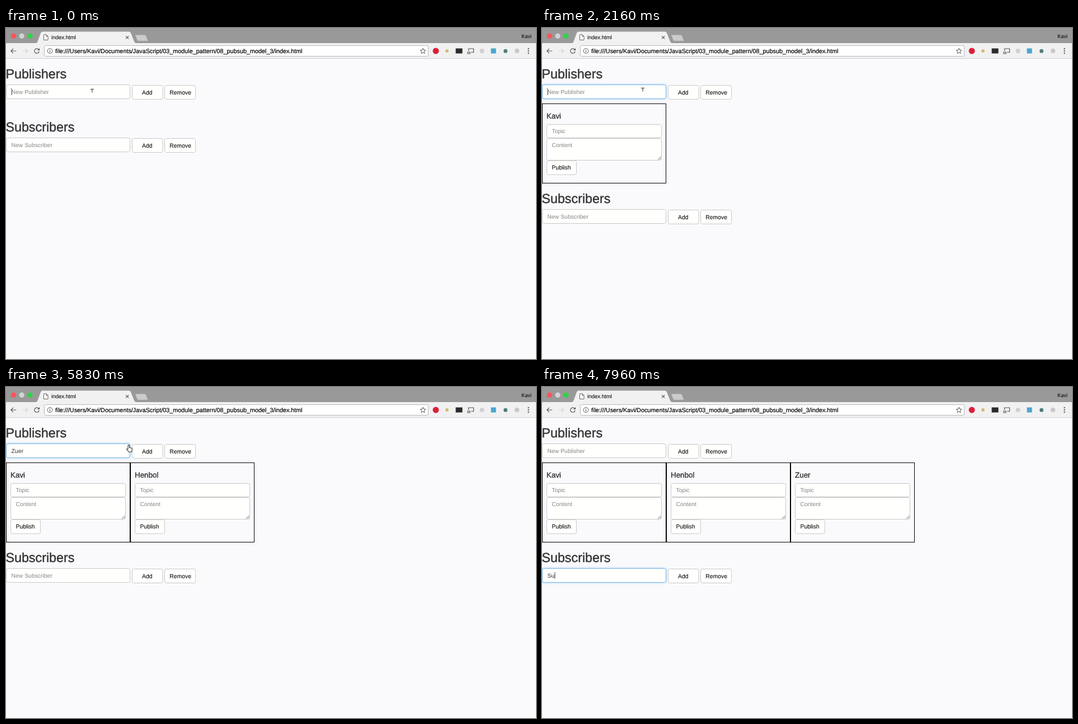
These frames come from a looping animation (947 by 592 pixels, 8000 ms). An HTML page:

```html
<!DOCTYPE html>
<html lang="en">
<head>
<meta charset="utf-8">
<title>index.html</title>
<style>
  html, body { margin: 0; width: 100%; height: 100%; overflow: hidden; background: #fafafd; }
  svg { display: block; width: 947px; height: 592px; }
  text { font: 10.4px "Liberation Sans", Arial, sans-serif; fill: #333; white-space: pre; text-rendering: geometricPrecision; }
  .head { font-size: 23.3px; stroke: #333; stroke-width: .4px; }
  .name { font-size: 13.4px; stroke: #333; stroke-width: .35px; }
  .hint { fill: #858587; }
  .dark { fill: #161616; stroke: #161616; stroke-width: .12px; }
  .box { fill: #fffffd; stroke: #c8c8c8; }
  .line { fill: none; stroke: #555; stroke-width: 1.2; }
</style>
</head>
<body>
<svg id="stage" viewBox="0 0 947 592">
  <defs>
    <filter id="soft" x="-10%" y="-50%" width="120%" height="200%"><feGaussianBlur stdDeviation="1.4"/></filter>
    <linearGradient id="press" x2="0" y2="1">
      <stop stop-color="#bdbdbd"/><stop offset=".25" stop-color="#d4d4d4"/>
    </linearGradient>
  </defs>

  <g id="chrome">
    <rect width="947" height="27" fill="#999"/>
    <rect y="27" width="947" height="28" fill="#f1f1f2"/>
    <path d="M0 54.5H947" stroke="#cfcfd1"/>
    <path d="M53 27Q55.500 27 56.500 24L62 9Q63 6.500 65 6.500H220Q222 6.500 223 9L229 24Q230 27 233 27Z" fill="#f1f1f2"/>
    <path d="M231 12.500H248Q249.500 12.500 250 14L253.500 23H237Q235 23 234.500 21.500Z" fill="#cbcbcb" stroke="#b4b4b4" stroke-width=".6"/>
    <circle cx="13.400" cy="14.400" r="4.700" fill="#f9555c"/>
    <circle cx="28.200" cy="14.400" r="4.700" fill="#d2d2d2"/>
    <circle cx="43" cy="14.400" r="4.700" fill="#32d14b"/>
    <path d="M67.500 12H72L75 15V21.500H67.500ZM72 12V15H75" fill="#fff" stroke="#555" stroke-width=".9"/>
    <path d="M214.200 14.400L219.200 19.400M219.200 14.400L214.200 19.400" class="line"/>
    <text x="81" y="20" class="dark" style="font-size:9.650px">index.html</text>
    <text x="921" y="18" class="dark" style="font-size:9.250px">Kavi</text>

    <path d="M18 41H9M13 36.800L8.800 41L13 45.200" class="line"/>
    <path d="M29.500 41H38.500M34.500 36.800L38.700 41L34.500 45.200" class="line" style="stroke:#d2d2d2"/>
    <path d="M58.200 38.200A4.200 4.200 0 1 0 59.200 42" class="line"/>
    <path d="M60 36V40H56Z" fill="#555"/>
    <rect x="68.500" y="31.500" width="686" height="19" rx="2" fill="#fff" stroke="#b9b9bb"/>
    <circle cx="78.500" cy="41" r="4.400" class="line" style="stroke-width:1"/>
    <path d="M78.500 40.200V43.500M78.500 38.200V39.300" class="line"/>
    <text x="88" y="44.800" style="font-size:10.820px;fill:#000;stroke:#000;stroke-width:.2px">file:///Users/Kavi/Documents/JavaScript/03_module_pattern/08_pubsub_model_3/index.html</text>
    <path d="M745 36.300L746.400 39.500L749.900 39.800L747.200 42.100L748 45.500L745 43.700L742 45.500L742.800 42.100L740.100 39.800L743.600 39.500Z" class="line" style="stroke-width:1"/>

    <circle cx="768" cy="41" r="5.500" fill="#dc2038"/>
    <rect x="785.500" y="38.500" width="5" height="5" fill="#d2b36a"/>
    <rect x="803.500" y="36.500" width="12" height="9" fill="#2b2b2b"/>
    <path d="M826.500 41V37H835.500V43.500H831M825 43H829V46H825Z" class="line"/>
    <circle cx="850.500" cy="41" r="4" fill="#d0d0d2"/>
    <rect x="866.500" y="36.500" width="9" height="9" fill="#4aa6cf"/>
    <circle cx="892.500" cy="41.300" r="3.500" fill="#4d7f7c"/>
    <circle cx="913" cy="41" r="4.300" fill="#c9c9cb"/>
    <g fill="#555"><circle cx="933.500" cy="37" r="1.200"/><circle cx="933.500" cy="41" r="1.200"/><circle cx="933.500" cy="45" r="1.200"/></g>
  </g>
</svg>

<script>
const LOOP = 8000;
const stage = document.getElementById('stage');

function el(tag, attrs, parent = stage, text) {
  const node = document.createElementNS('http://www.w3.org/2000/svg', tag);
  for (const k in attrs) node.setAttribute(k, attrs[k]);
  if (text !== undefined) node.textContent = text;
  return parent.appendChild(node);
}
const set = (node, attrs) => { for (const k in attrs) node.setAttribute(k, attrs[k]); };
const show = (node, on) => node.setAttribute('visibility', on ? 'visible' : 'hidden');
const label = (parent, x, y, cls, text) => el('text', { x, y, class: cls }, parent, text);
const box = (parent, x, y, width, height) =>
  el('rect', { x, y, width, height, rx: 3, class: 'box' }, parent);

function button(parent, x, y, width, text, textX) {
  const rect = box(parent, x, y, width, 25);
  label(parent, textX, y + 16, 'dark', text);
  return rect;
}

// Heading, entry field and two buttons; y is the top of the field.
function section(title, hint, y) {
  const g = el('g', {});
  label(g, -.6, y - 11.7, 'head', title);
  const glow = el('rect', { x: 0, y: y - .5, width: 222, height: 26, rx: 4, fill: 'none',
    stroke: '#66afe9', 'stroke-width': 2.4, filter: 'url(#soft)' }, g);
  const field = box(g, .5, y, 221, 25);
  const empty = label(g, 9.5, y + 16.3, 'hint', hint);
  const value = label(g, 9.5, y + 16.3, '', '');
  const caret = el('rect', { y: y + 6.5, width: 1, height: 12, fill: '#444' }, g);
  const add = button(g, 225.5, y + 1, 54.5, 'Add', 243);
  button(g, 283.5, y + 1, 55, 'Remove', 292.3);
  return { g, glow, field, empty, value, caret, add };
}

function card(i, name) {
  const g = el('g', { transform: `translate(${222 * i} 0)` });
  el('rect', { x: .5, y: 135.5, width: 221, height: 142, fill: 'none', stroke: '#000' }, g);
  label(g, 8, 162, 'name', name);
  box(g, 8.5, 172.5, 205, 24);
  label(g, 17.5, 188.2, 'hint', 'Topic');
  box(g, 8.5, 197.5, 205, 39);
  label(g, 17.5, 213.2, 'hint', 'Content');
  el('path', { d: 'M207 235.5L212.500 230M210 235.500L212.500 233', class: 'line', style: 'stroke-width:.9' }, g);
  button(g, 8.5, 237.3, 53, 'Publish', 17.5);
  return g;
}

const pub = section('Publishers', 'New Publisher', 101.5);
const sub = section('Subscribers', 'New Subscriber', 196.5);
const ring = el('rect', { x: 225, y: 102, width: 55.5, height: 26, rx: 2.5, fill: 'none',
  stroke: '#64a2ea', 'stroke-width': 2.4 }, pub.g);

// Each round: focus on the field, key times, press and release of Add.
const rounds = [
  { name: 'Kavi', focus: 0, keys: [420, 560, 700, 830], press: 1450, add: 1600 },
  { name: 'Henbol', focus: 2000, keys: [2330, 2480, 2630, 3450, 3600, 3720], press: 4120, add: 4230 },
  { name: 'Zuer', focus: 4700, keys: [4960, 5080, 5190, 5300], press: 6150, add: 6280 }
];
rounds.forEach((r, i) => r.card = card(i, r.name));
const last = { name: 'Su', focus: 6930, keys: [7630, 7880], press: Infinity, add: Infinity };

const hand = el('path', { fill: '#fff', stroke: '#333', 'stroke-width': 1.1, 'stroke-linejoin': 'round',
  d: 'M3 7.500V1.400A1.200 1.200 0 0 1 5.500 1.400V5L9.300 5.800Q10.700 6.200 10.400 7.700L9.900 10.600L9 12.700H4.600L1 8.700Q.3 7.200 1.800 7.100Z' });
const beam = el('path', { d: 'M-3 -2.500H3M0 -2.500V3.500', fill: 'none', stroke: '#666', 'stroke-width': 1.4 });

// Pointer: time, x, y; hidden while keys are being typed.
const path = [
  [0, 154, 112], [950, 154, 112], [1340, 242, 116], [1640, 242, 116], [1950, 186, 110],
  [2100, 180, 110], [3800, 180, 110], [4060, 242, 110], [4260, 242, 110], [4430, 220, 103],
  [4650, 190, 106], [5660, 190, 106], [5830, 219, 103.5], [6060, 242, 110], [6320, 242, 110],
  [6560, 240, 107.5], [6620, 240, 108], [6900, 152, 335], [7050, 152, 335], [7360, 160, 338]
];
const hidden = [[420, 950], [2330, 3800], [4960, 5640], [7630, LOOP]];
const hands = [[1270, 1720], [4000, 4380], [5800, 6650]];
const within = (spans, t) => spans.some(([a, b]) => t >= a && t < b);
const clamp = v => Math.max(0, Math.min(1, v));

function pointAt(t) {
  const i = path.findIndex(p => p[0] > t);
  if (i < 0) return path[path.length - 1].slice(1);
  const [a, b] = [path[i - 1], path[i]];
  const u = (t - a[0]) / (b[0] - a[0]);
  const e = u * u * (3 - 2 * u);
  return [a[1] + (b[1] - a[1]) * e, a[2] + (b[2] - a[2]) * e];
}

const mix = (a, b, u) => `rgb(${a.map((v, i) => Math.round(v + (b[i] - v) * u))})`;

function drawField(s, r, t) {
  const active = r && t >= r.focus && t < r.press;
  const typed = r && t < r.add ? r.keys.filter(k => k <= t) : [];
  const text = r ? r.name.slice(0, typed.length) : '';
  const level = r ? clamp((t - r.focus) / 150) * (1 - clamp((t - r.press) / 150)) : 0;
  s.value.textContent = text;
  show(s.empty, !text);
  s.field.style.stroke = mix([200, 200, 200], [112, 176, 226], level);
  s.glow.setAttribute('opacity', level * .35);
  const since = r ? t - Math.max(r.focus, ...typed.map((_, i) => r.keys[i])) : 0;
  show(s.caret, active && since % 1000 < 500);
  s.caret.setAttribute('x', 9.8 + (text ? s.value.getComputedTextLength() : 0));
}

function draw(t) {
  const round = rounds.filter(r => t >= r.focus).pop();
  const next = rounds[rounds.indexOf(round) + 1] || last;
  rounds.forEach(r => show(r.card, t >= r.add));
  sub.g.setAttribute('transform', `translate(0 ${t >= rounds[0].add ? 128 : 0})`);
  drawField(pub, round, t);
  drawField(sub, t >= last.focus ? last : null, t);

  const [x, y] = pointAt(t);
  const visible = !within(hidden, t);
  const pointing = within(hands, t);
  const over = visible && x > 225 && x < 280 && y > 102 && y < 128;
  const focused = t >= round.press && t < next.focus;
  const pressed = focused && t < round.add;
  pub.add.style.fill = pressed ? 'url(#press)' : focused || over ? '#e6e6e6' : '#fffffd';
  pub.add.style.stroke = pressed ? '#8c8c8c' : focused || over ? '#adadad' : '#c8c8c8';
  show(ring, focused);

  set(hand, { transform: `translate(${x - 4} ${y})` });
  set(beam, { transform: `translate(${x} ${y})` });
  show(hand, visible && pointing);
  show(beam, visible && !pointing);
}

const start = performance.now();
function tick() {
  draw((performance.now() - start) % LOOP);
  requestAnimationFrame(tick);
}
tick();
</script>
</body>
</html>
```
